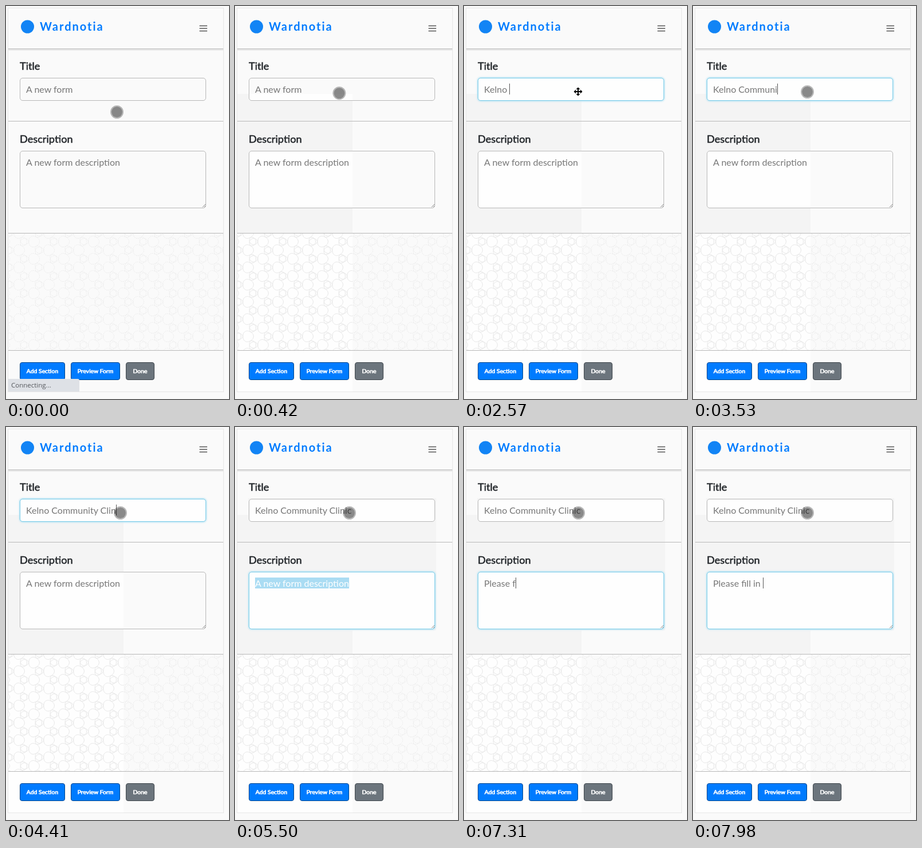
These frames come from a looping animation (389 by 684 pixels, 8 s). An HTML page:

```html
<!DOCTYPE html>
<html lang="en">
<head>
<meta charset="utf-8">
<title>Form editor</title>
<style>
html, body { margin: 0; width: 100%; height: 100%; overflow: hidden; background: #fafafa; }
#stage { position: relative; width: 389px; height: 684px; overflow: hidden; font-family: Lato, sans-serif; }
#stage > * { position: absolute; box-sizing: border-box; }
svg { left: 0; top: 0; }
.field { left: 24px; width: 325px; padding: 9px 10px; border: 1px solid #b8b8b8; border-radius: 5px;
  font-size: 16px; line-height: 19px; color: #777; white-space: pre; }
.field.lit { background: #fefefe; }
.field.focus { border-color: #78cbe8; box-shadow: 0 0 3px 1px #b5e3f4; }
.field span { display: inline-block; height: 19px; vertical-align: top; }
.field .picked { background: #aadcf3; color: #fff; }
.field i { display: inline-block; width: 1px; height: 19px; margin-right: -1px; vertical-align: top; background: #555; }
#title { top: 125px; height: 40px; }
#desc { top: 252px; height: 100px; }
.button { top: 620px; height: 31px; border: 1px solid #00458c; border-radius: 4px; background: #007bff; color: #fff;
  font-size: 10.4px; line-height: 29px; text-align: center; white-space: nowrap; -webkit-text-stroke: .7px #fff; }
.button.done { background: #6c757d; border-color: #3f464c; }
#status { left: 4px; top: 649px; width: 124px; height: 22px; padding-left: 5px; border-radius: 0 3px 0 0;
  background: #dee1e6; color: #54575b; font: 11.5px/22px "Open Sans", sans-serif; }
</style>
</head>
<body>
<div id="stage">
  <svg width="389" height="684">
    <defs>
      <pattern id="faint" width="52" height="30" patternUnits="userSpaceOnUse" x="14" y="410">
        <path class="clovers" fill="none" stroke="#e6e6e6" stroke-dasharray="1.5 1.5"/>
      </pattern>
      <pattern id="clear" width="52" height="30" patternUnits="userSpaceOnUse" x="14" y="410">
        <path class="clovers" fill="none" stroke="#e6e6e6"/>
      </pattern>
    </defs>
    <rect x="3.5" y="3.5" width="376" height="668" fill="#fafafa" stroke="#e6e6e6"/>
    <rect x="4" y="396" width="375" height="203" fill="url(#faint)"/>
    <g id="leftTint">
      <rect x="4" y="153" width="201" height="242" fill="#f4f4f4"/>
      <rect x="4" y="395" width="201" height="276" fill="#fefefe"/>
      <rect x="4" y="396" width="201" height="203" fill="url(#clear)"/>
      <rect x="25" y="153" width="180" height="11" fill="#fefefe"/>
      <rect x="25" y="253" width="180" height="98" fill="#fefefe"/>
    </g>
    <rect id="formTint" x="23" y="124" width="328" height="230" fill="#f4f4f4"/>
    <path d="M4 76h375" stroke="#e7e7e7" stroke-width="3"/>
    <path d="M4 74.5h375M4 200.5h375M4 395.5h375M4 599.5h375" stroke="#b9b9b9"/>
    <circle cx="37.5" cy="36" r="11.5" fill="#1284f5"/>
    <text x="59" y="43" font-size="20" font-weight="700" letter-spacing="2" fill="#007bff">Wardnotia</text>
    <path d="M337.5 34.5h13.5M337.5 39h13.5M337.5 43.5h13.5" stroke="#555" stroke-width="1.4"/>
    <g font-size="18.2" fill="#212529" stroke="#212529" stroke-width=".5">
      <text x="24" y="111">Title</text>
      <text x="24" y="238">Description</text>
    </g>
  </svg>

  <div id="title" class="field"></div>
  <div id="desc" class="field"></div>
  <div class="button" style="left:24px;width:79px">Add Section</div>
  <div class="button" style="left:113px;width:86px">Preview Form</div>
  <div class="button done" style="left:209px;width:50px">Done</div>
  <div id="status">Connecting...</div>

  <svg width="389" height="684">
    <path d="M343 350l5-5M346 350l2-2" stroke="#666" stroke-width=".8"/>
    <g id="pointer">
      <g id="dot">
        <circle r="10.5" fill="none" stroke="#000" stroke-opacity=".27" stroke-width="2"/>
        <circle r="9.5" fill-opacity=".46"/>
      </g>
      <path id="cross" transform="translate(-.5 -.5)" stroke="#fff" stroke-width="1.6" paint-order="stroke"
        d="M0-7.5l3.5 3.5h-2.5v3h3v-2.5l3.5 3.5l-3.5 3.5v-2.5h-3v3h2.5l-3.5 3.5l-3.5-3.5h2.5v-3h-3v2.5l-3.5-3.5l3.5-3.5v2.5h3v-3h-2.5z"/>
    </g>
  </svg>
</div>
<script>
const LOOP = 8000;
const $ = id => document.getElementById(id);

// Three round lobes joined by hollows that hold the neighbours' lobes.
function clover(cx, cy, r = 7.5) {
  const point = k => {
    const angle = (k * 60 + 30) * Math.PI / 180;
    const reach = r * Math.sqrt(3);
    return `${(cx + reach * Math.cos(angle)).toFixed(2)} ${(cy + reach * Math.sin(angle)).toFixed(2)}`;
  };
  let d = `M${point(0)}`;
  for (let k = 0; k < 6; k++) {
    const lobe = k % 2;
    d += `A${r} ${r} 0 ${lobe} ${lobe} ${point(k + 1)}`;
  }
  return d;
}

function cloverTile() {
  let d = '';
  for (let col = -1; col <= 3; col++)
    for (let row = -1; row <= 2; row++)
      d += clover(col * 26, (row + Math.abs(col % 2) / 2) * 30);
  return d;
}
document.querySelectorAll('.clovers').forEach(p => p.setAttribute('d', cloverTile()));

const within = (t, from, to) => t >= from && t < to;

// The hand swings left on its way up to the title field.
function pointerAt(t) {
  const u = t < 150 ? 0 : Math.min(1, Math.ceil((t - 149) / 135) / 5);
  const rise = 1 - (1 - u) ** 3;
  return [193.5 + 6 * u - 16 * Math.sin(Math.PI * u), 184.5 - 35 * rise];
}

const pointerToggles = [1470, 2030, 2450, 2860, 3920, 4160, 6190, 6620];

const fields = [
  {
    box: $('title'), hint: 'A new form', focus: 540, blur: 5500, caretOff: 5100,
    words: [
      { text: 'Kelno ', from: 2030, to: 2570 },
      { text: 'Community ', from: 2740, to: 3770 },
      { text: 'Clinic', from: 3920, to: 4670 }
    ]
  },
  {
    box: $('desc'), hint: 'A new form description', focus: 5500, blur: LOOP, caretOff: LOOP,
    words: [
      { text: 'Please ', from: 6620, to: 7160 },
      { text: 'fill ', from: 7310, to: 7720 },
      { text: 'in ', from: 7860, to: 7980 }
    ]
  }
];

// Each word is typed at an even pace, first letter at once.
function typed({ text, from, to }, t) {
  if (t < from) return '';
  return text.slice(0, 1 + Math.floor((t - from) / (to - from) * (text.length - 1)));
}

function drawField(f, t) {
  const value = f.words.map(word => typed(word, t)).join('');
  const focused = within(t, f.focus, f.blur);
  const caret = value && t < f.caretOff ? '<i></i>' : '';
  const style = focused && !value ? 'picked' : '';
  const html = `<span class="${style}">${value || f.hint}</span>${caret}`;
  if (f.html !== html) f.box.innerHTML = f.html = html;
  f.box.classList.toggle('focus', focused);
  f.box.classList.toggle('lit', t >= f.focus);
}

const show = (id, on) => $(id).style.display = on ? '' : 'none';

function render(t) {
  const cross = pointerToggles.filter(time => time <= t).length % 2 === 1;
  $('pointer').setAttribute('transform', `translate(${pointerAt(t).join(' ')})`);
  show('cross', cross);
  show('dot', !cross);
  show('status', t < 150);
  show('leftTint', t >= 150);
  show('formTint', t >= 5500);
  fields.forEach(f => drawField(f, t));
}

const start = performance.now();
function tick() {
  render((performance.now() - start) % LOOP);
  requestAnimationFrame(tick);
}
tick();
</script>
</body>
</html>
```
